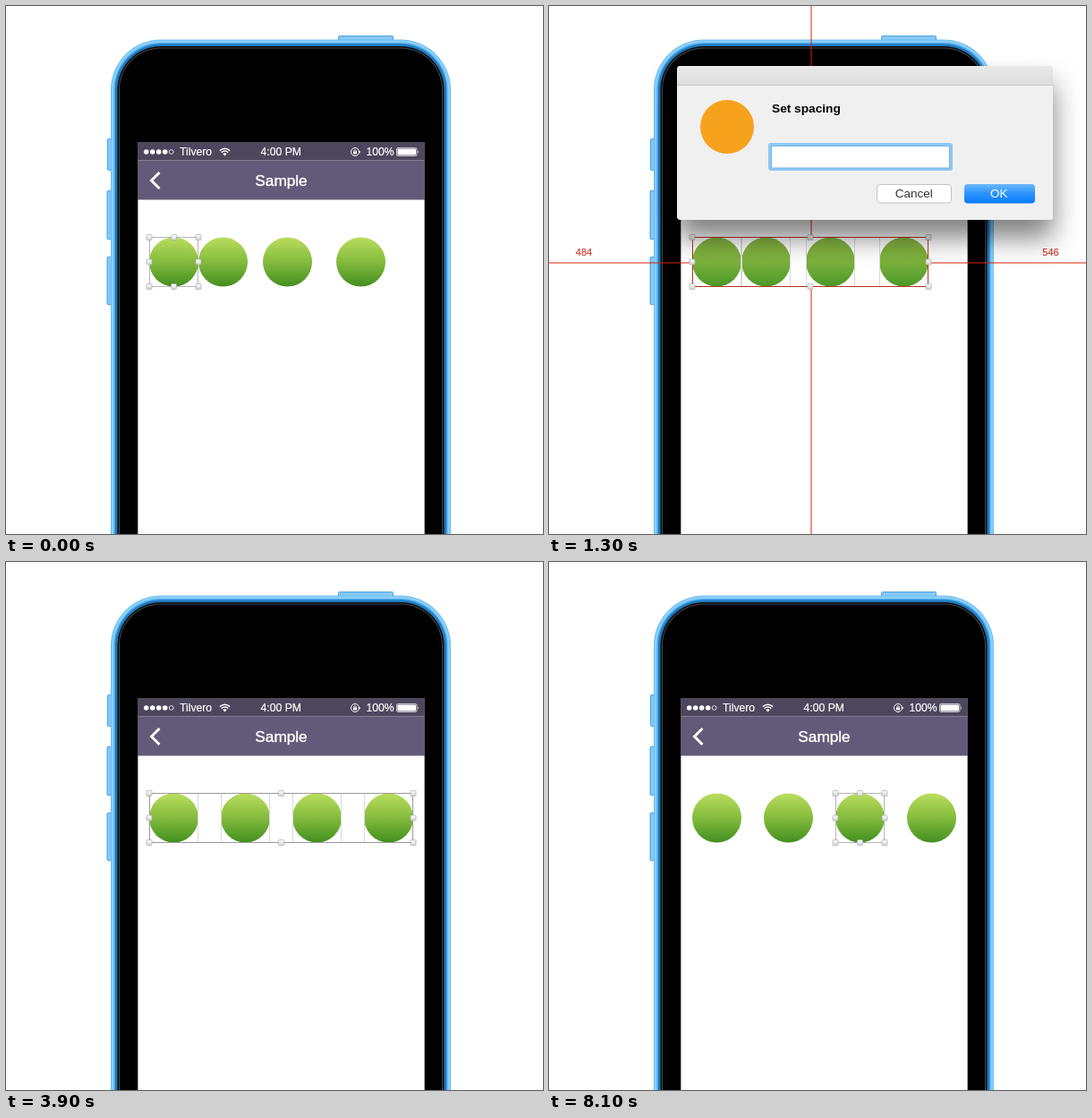
Animation, 600 px wide and 590 px high, one loop 9.1 s. Source, as an HTML page:

```html
<!DOCTYPE html>
<html lang="en">
<head>
<meta charset="utf-8">
<title>Set spacing</title>
<style>
  html, body { margin: 0; width: 100%; height: 100%; overflow: hidden; background: #fff; }
  svg { display: block; width: 600px; height: 590px; font-family: "Liberation Sans", Arial, sans-serif; }
  .crisp { shape-rendering: crispEdges; }
  .bar { fill: #fff; font-size: 12.2px; stroke: #fff; stroke-width: .2; }
  .label { fill: #c81e08; font-size: 11px; text-anchor: middle; }
  .mid { text-anchor: middle; }
</style>
</head>
<body>
<svg viewBox="0 0 600 590">
  <defs>
    <linearGradient id="ball" x2="0" y2="1">
      <stop stop-color="#badd5e"/><stop offset=".45" stop-color="#8abf40"/><stop offset="1" stop-color="#438f20"/>
    </linearGradient>
    <linearGradient id="mutedBall" x2="0" y2="1">
      <stop stop-color="#86b343"/><stop offset=".5" stop-color="#7bb13c"/><stop offset="1" stop-color="#4b9827"/>
    </linearGradient>
    <linearGradient id="knob" x2="0" y2="1"><stop stop-color="#fff"/><stop offset="1" stop-color="#d4d4d4"/></linearGradient>
    <linearGradient id="title" x2="0" y2="1"><stop stop-color="#e9e9e9"/><stop offset="1" stop-color="#dedede"/></linearGradient>
    <linearGradient id="ok" x2="0" y2="1">
      <stop stop-color="#6bb8fb"/><stop offset=".5" stop-color="#2b93fd"/><stop offset="1" stop-color="#087bfd"/>
    </linearGradient>
    <filter id="shadow" x="-20%" y="-30%" width="140%" height="180%">
      <feDropShadow dx="0" dy="20" stdDeviation="15" flood-opacity=".5"/>
    </filter>
  </defs>

  <g fill="#86c9f5" stroke="#3f9ade" stroke-width=".9">
    <rect x="113.5" y="148.5" width="6" height="35" rx="1"/>
    <rect x="113" y="206.5" width="6" height="54" rx="1"/>
    <rect x="113" y="280.5" width="6" height="53" rx="1"/>
    <rect x="371.5" y="33.5" width="61" height="6" rx="1"/>
  </g>
  <g id="body"></g>

  <rect x="147" y="152" width="321" height="440" fill="#fff"/>
  <rect x="147" y="152" width="321" height="21" fill="#4d465d"/>
  <rect x="147" y="172" width="321" height="1" fill="#857c93"/>
  <rect x="147" y="173" width="321" height="43.5" fill="#635978"/>
  <path d="M147.5 590V152.5H467.5V590" fill="none" stroke="#555" stroke-opacity=".5"/>
  <g fill="#fff">
    <circle cx="156.7" cy="163" r="2.8"/><circle cx="163.7" cy="163" r="2.8"/>
    <circle cx="170.7" cy="163" r="2.8"/><circle cx="177.7" cy="163" r="2.8"/>
    <circle cx="184.7" cy="163" r="2.4" fill="none" stroke="#fff" stroke-width=".8"/>
    <path d="M242.3 165.2q2.2-1.8 4.4 0l-2.2 2.3z"/>
    <path d="M238.8 161.6q5.7-4.8 11.4 0M240.7 163.6q3.8-3.1 7.6 0" fill="none" stroke="#fff" stroke-width="1.4"/>
    <circle cx="390" cy="163" r="4.5" fill="none" stroke="#fff"/>
    <rect x="388" y="162.4" width="4" height="3"/>
    <path d="M388.7 162.5v-1q1.3-2 2.6 0v1" fill="none" stroke="#fff" stroke-width=".8"/>
    <path d="M393.5 162.5h3l-1.5 2z"/>
    <rect x="436.5" y="158.5" width="22.5" height="9" rx="1.5" fill="none" stroke="#fff" stroke-width=".7"/>
    <rect x="437.5" y="159.5" width="20.5" height="7" rx=".7"/>
    <path d="M460 161.3q1.6 1.7 0 3.4z"/>
  </g>
  <text class="bar" x="194" y="167">Tilvero</text>
  <text class="bar mid" x="307.3" y="167">4:00 PM</text>
  <text class="bar" x="402.5" y="167">100%</text>
  <path d="M171.5 186L162.5 195L171.5 204" fill="none" stroke="#fff" stroke-width="3"/>
  <text class="mid" x="307.5" y="201" font-size="17.2" fill="#fff" stroke="#fff" stroke-width=".4">Sample</text>

  <g id="canvas"></g>

  <g id="dialog">
    <g filter="url(#shadow)"><rect x="143" y="67" width="420" height="172" rx="4" fill="#f0f0f0"/></g>
    <path d="M143 88V71q0-4 4-4H559q4 0 4 4V88z" fill="url(#title)"/>
    <rect x="143" y="88" width="420" height="1" fill="#cbcbcb"/>
    <circle cx="199" cy="135" r="30" fill="#f6a21d"/>
    <text x="249" y="119" font-size="13.7" font-weight="bold">Set spacing</text>
    <rect x="245" y="153" width="206" height="31" rx="3" fill="#8fc7f4"/>
    <rect x="248.5" y="156.5" width="199" height="24.5" fill="#fff" stroke="#72b5ea"/>
    <text id="value" x="252" y="172" font-size="12.7"></text>
    <rect id="caret" y="160" width="1" height="16"/>
    <rect x="366.5" y="199.5" width="83" height="20.5" rx="3.5" fill="#fff" stroke="#c3c3c3"/>
    <text class="mid" x="407.7" y="214" font-size="13.5" fill="#333">Cancel</text>
    <rect x="464" y="199" width="79" height="21.5" rx="4" fill="url(#ok)"/>
    <text class="mid" x="502.7" y="214" font-size="13.5" fill="#fff">OK</text>
  </g>

  <path id="outline" class="crisp" d="M117 600V38H497V600" fill="none" stroke="#18b5f0" stroke-width="2"/>
  <path id="cursor" d="M0 0V16.5L3.8 13L6.4 19L9 17.8L6.4 12H11.7Z" stroke="#fff" stroke-width="1.2"/>
</svg>

<script>
const LOOP = 9100, STEP = 200, TOP = 258.5, SIZE = 55;
const $ = id => document.getElementById(id);
const uneven = [160, 215, 287, 369], even = [160, 240, 320, 400];

// Value of the last [time, value] entry that has been reached.
const at = (track, t) => track.filter(([start]) => start <= t).pop()[1];

const selectionTrack = [[0, [0, 0]], [100, [0, 1]], [300, [0, 2]], [500, [0, 3]], [4500, null], [5300, [2, 2]]];
const measureTrack = [[0, null], [5700, 1], [6700, null], [6900, 3], [7900, null]];
const dialogTrack = [[0, [0, 1]], [700, [.83, 1.057]], [900, [1, 1]], [3100, [.4, 1]], [3300, [0, 1]]];
const valueTrack = [[0, ''], [1700, '5'], [1900, '50']];
const caretTrack = [[0, 1], [1300, 0], [1500, 1], [2300, 0]];
const cursorTrack = [
  [0, null], [4700, [462, 302]], [4900, [455, 288]], [5100, [372, 284]], [5300, [352, 285]],
  [5500, [305, 286]], [5700, [274, 286]], [5900, [268, 286]], [6500, [333, 282]],
  [6700, [386, 283]], [6900, [420, 285]], [7300, [432, 286]], [8100, null]
];

// Nested outlines of the phone, from the rim inwards.
const shells = [[0, '#6fbdf0'], [1, '#8ad0fa'], [3.5, '#4aa6e6'], [5, '#1f78c0'], [7.5, '#0b0b0b'], [9, '#454545'], [10, '#000']];
$('body').innerHTML = shells.map(([inset, color]) =>
  `<rect x="${117 + inset}" y="${37.5 + inset}" width="${380 - 2 * inset}" height="700" rx="${56 - inset}" fill="${color}"/>`).join('');

const path = (d, attrs) => `<path d="${d}" fill="none" ${attrs}/>`;
const crisp = (d, attrs) => path(d, `class="crisp" ${attrs}`);
const box = (x, width, color) => crisp(`M${x + .5} ${TOP}h${width - 1}v${SIZE}h${1 - width}z`, `stroke="${color}"`);
const label = (x, y, text) => `<text class="label" x="${x}" y="${y}">${text}</text>`;

function handles(x, width) {
  let out = '';
  for (const i of [0, .5, 1]) for (const j of [0, .5, 1]) {
    if (i === .5 && j === .5) continue;
    out += `<rect x="${x + i * width - 3}" y="${TOP + j * SIZE - 3}" width="6" height="6" rx="1" fill="url(#knob)" stroke="#aaa" stroke-width=".7"/>`;
  }
  return out;
}

function drawSelection([first, last], xs, color) {
  const left = xs[first], width = xs[last] + SIZE - left;
  let edges = '';
  if (last > first) {
    for (const x of xs.slice(first, last + 1)) edges += `M${x + .5} ${TOP}v${SIZE}M${x + SIZE - .5} ${TOP}v${SIZE}`;
  }
  return crisp(edges, 'stroke="#d9d9d9"') + box(left, width, color) + handles(left, width);
}

function drawMeasure(target, selected, xs) {
  const [a, b] = [target, selected].sort().map(i => xs[i]);
  const from = a + SIZE;
  const dashes = target < selected ? [a, b] : [from, b + SIZE];
  return box(xs[target], SIZE, '#e02a10')
    + path(`M${from} 287H${b}`, 'stroke="#d42a10"')
    + crisp(`M${dashes[0]} 313.5H${dashes[1]}`, 'stroke="#e0523c" stroke-dasharray="5 3"')
    + label((from + b) / 2, 278, '50');
}

function draw(t) {
  const xs = t < 3300 ? uneven : even;
  const guides = t >= 500 && t < 3300;
  const selection = at(selectionTrack, t), target = at(measureTrack, t);
  const fill = guides ? 'mutedBall' : 'ball';

  let art = xs.map(x => `<circle cx="${x + SIZE / 2}" cy="286" r="27.5" fill="url(#${fill})"/>`).join('');
  if (guides) {
    art += path('M293 0V258M293 314V590M0 287H160M424 287H600', 'stroke="#dc2206"')
      + label(39, 279, '484') + label(560.5, 279, '546') + label(280, 95, '671');
  }
  if (target !== null) art += drawMeasure(target, 2, xs);
  if (selection) {
    const color = guides ? '#b5311c' : target !== null ? '#e02a10' : selection[0] === selection[1] ? '#b4b4b4' : '#999';
    art += drawSelection(selection, xs, color);
  }
  $('canvas').innerHTML = art;

  const [opacity, scale] = at(dialogTrack, t);
  $('dialog').setAttribute('opacity', opacity);
  $('dialog').setAttribute('transform', `translate(353 153) scale(${scale}) translate(-353 -153)`);
  const value = at(valueTrack, t);
  $('value').textContent = value;
  $('caret').setAttribute('x', 252 + value.length * 7.1);
  $('caret').setAttribute('opacity', at(caretTrack, t));

  $('outline').style.display = t >= 5500 && t < 7900 ? '' : 'none';
  const cursor = at(cursorTrack, t);
  $('cursor').style.display = cursor ? '' : 'none';
  if (cursor) $('cursor').setAttribute('transform', `translate(${cursor})`);
}

let shown = -1;
const begin = performance.now();
function tick() {
  const t = (performance.now() - begin) % LOOP;
  const step = t < 100 ? 0 : 100 + Math.floor((t - 100) / STEP) * STEP;
  if (step !== shown) draw(shown = step);
  requestAnimationFrame(tick);
}
tick();
</script>
</body>
</html>
```
